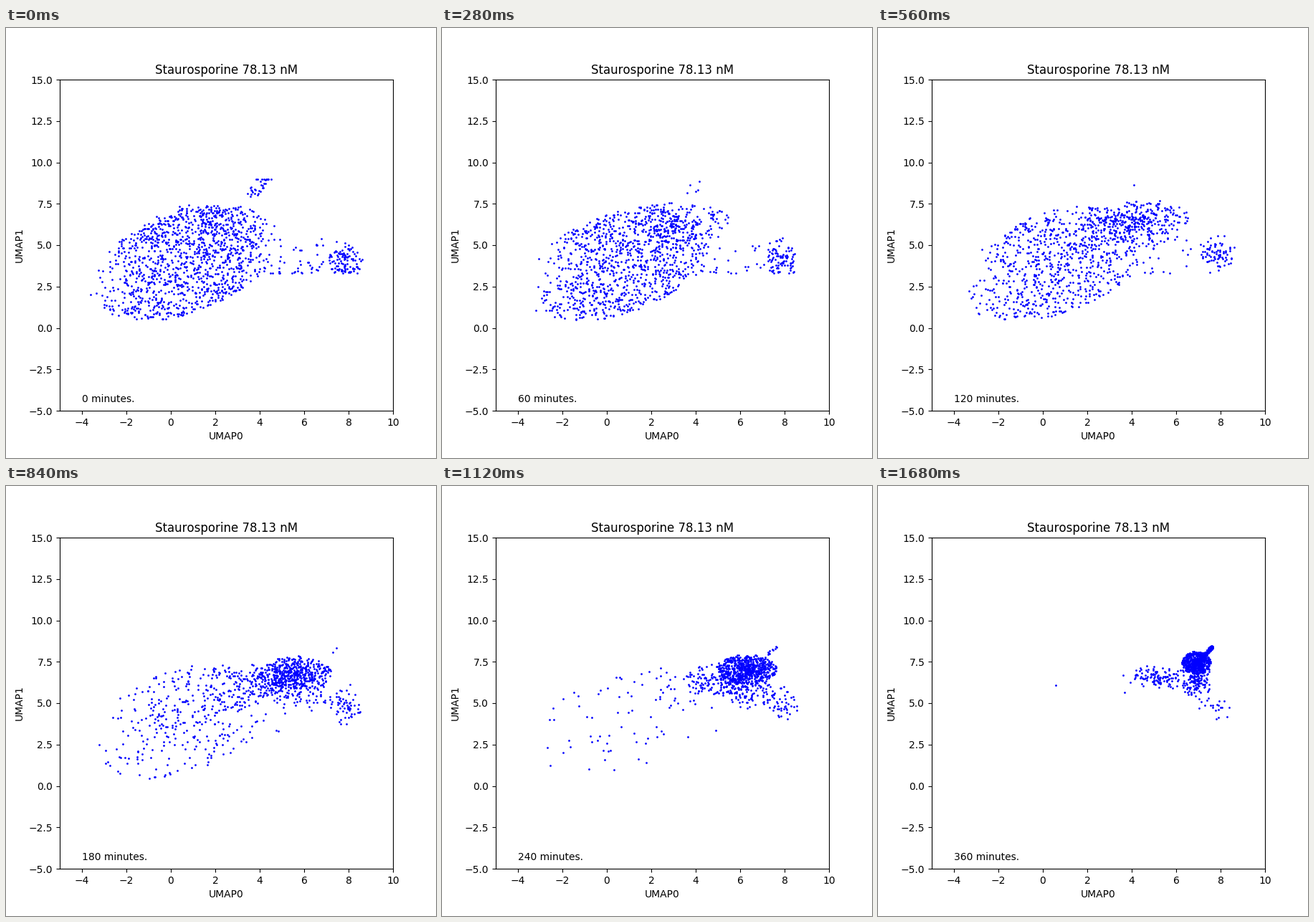
A matplotlib script for the animation above (1.82 s loop, 600 px wide and 600 px high).

```python
import numpy as np
import matplotlib.pyplot as plt
from matplotlib.animation import FuncAnimation

STEPS, INTERVAL, MINUTES = 13, 140, 30
CELLS = 1230

plt.rcParams["text.kerning_factor"] = 6


def smooth(s):
    s = np.clip(s, 0, 1)
    return s * s * (3 - 2 * s)


def pool(seed, size, k):
    """Fixed random pairs in the unit square that wander from step to step."""
    home = np.random.default_rng(seed).random((2, size))
    drift = np.random.default_rng([seed, k]).normal(0, .1, (2, size))
    return 1 - np.abs((home + drift) % 2 - 1)


def body(u, v, spread):
    """Healthy cells between two parabolas."""
    x = -2.2 + 5.8 * u + .6 * spread
    low = .45 + .11 * (x + 1) ** 2
    high = 7.4 - .12 * (x - 1.9) ** 2
    return x, low + (high - low) * v


def cloud(t, u, v, kind):
    """Affected cells: a shrinking disc with a left tail and a lower skirt."""
    left = 1 - t
    r, a = u ** .7, 2 * np.pi * v
    x = 6.9 - 5.2 * left ** 2 + (.65 + 2 * left) * r * np.cos(a)
    y = 7.45 - 1.2 * left + (.7 + .6 * left) * r * np.sin(a)
    tail, skirt = kind < .15, kind > .82
    x -= tail * t * (.8 + 14 * kind)
    y -= tail * .9 * t + skirt * (.4 + 7 * (kind - .82))
    return x, y


def crowd(t, k):
    rng = np.random.default_rng(7)
    u, v, kind = rng.random((3, CELLS))
    spread = np.clip(rng.normal(size=CELLS), -2.6, 2.6)
    turn = .3 + .1 * u + .1 * v + rng.logistic(0, .08, CELLS)
    turn[::8] = -1  # these sit in the upper band from the start
    x0, y0 = body(*pool(1, CELLS, k), spread)
    x1, y1 = cloud(t, *pool(2, CELLS, k), kind)
    s = smooth((t - turn) / .15)
    pts = np.array([x0 + (x1 - x0) * s, y0 + (y1 - y0) * s ** .5])
    return pts[:, :int(CELLS * (1 - .35 * t))]


def right(t, u, v):
    r = np.sqrt(-2 * np.log(.06 + .94 * u))
    rise = smooth(1.6 * t)
    y = .6 + rise + .6 * r * np.sin(2 * np.pi * v)
    return 7.8 + .4 * r * np.cos(2 * np.pi * v), 3.3 + np.abs(y)


def tip(t, u, v):
    s = np.sqrt(u)
    return 7.1 + .5 * s + .1 * v, 7.85 + .65 * s - .15 * v


def link(t, u, v):
    return 4.2 + 2.7 * u, 3.3 + 2.1 * v ** 1.4


def islet(t, u, v):
    return 3.35 + .6 * (u + v), np.minimum(7.9 + 1.5 * v, 8.98)


# Small groups with their head count over time
GROUPS = [
    (right, lambda t: 105 - 85 * t),
    (tip, lambda t: 110 * t ** 6),
    (link, lambda t: 50 * (1 - t) ** 4),
    (islet, lambda t: 32 * (1 - t) ** 10),
]


def cells(k):
    t = k / (STEPS - 1)
    parts = [crowd(t, k)]
    for seed, (place, count) in enumerate(GROUPS, 10):
        u, v = pool(seed, 120, k)[:, :round(count(t))]
        parts.append(np.array(place(t, u, v)))
    return np.hstack(parts)


fig, ax = plt.subplots(figsize=(6, 6), dpi=100)
ax.set(xlim=(-5, 10), ylim=(-5, 15), xlabel="UMAP0", ylabel="UMAP1",
       title="Staurosporine 78.13 nM", xticks=range(-4, 11, 2))
dots, = ax.plot([], [], "bo", markersize=1)
label = ax.text(-4, -4.5, "")


def update(k):
    dots.set_data(*cells(k))
    label.set_text(f"{k * MINUTES} minutes.")
    return dots, label


anim = FuncAnimation(fig, update, frames=STEPS, interval=INTERVAL,
                     repeat=True, repeat_delay=0)
plt.show()
```
